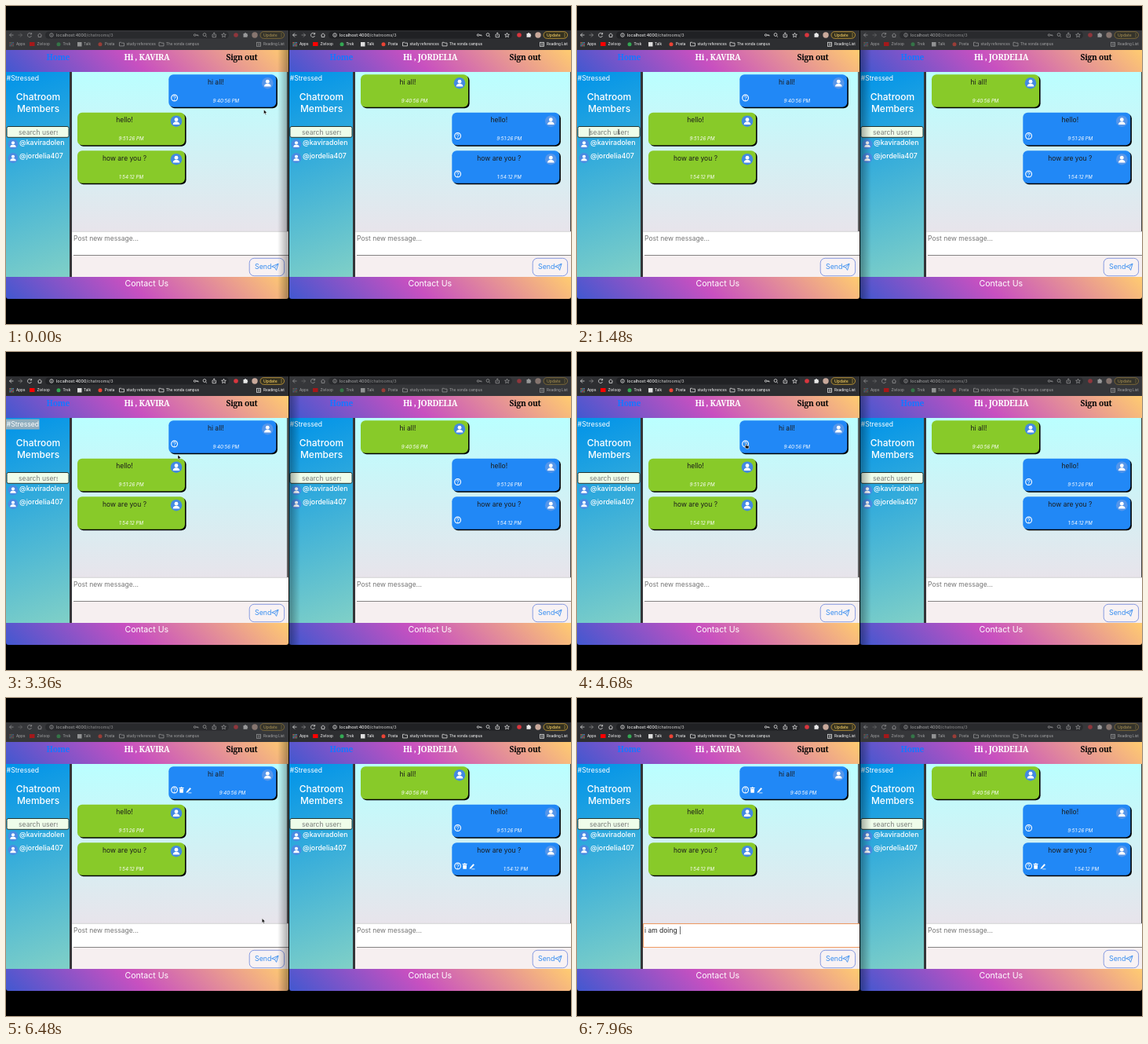
Write an HTML page that moves like this. It is 720x405 px and loops after 8000 ms.

```html
<!DOCTYPE html>
<html lang="en">
<head>
<meta charset="utf-8">
<title>Chatroom</title>
<style>
  html, body { margin: 0; width: 100%; height: 100%; overflow: hidden; background: #000; }
  #stage { position: relative; width: 720px; height: 405px; overflow: hidden; }
  #stage > svg { position: absolute; left: 0; top: 0; }
  .window { position: absolute; top: 31px; width: 359.7px; height: 342px; overflow: hidden; border-radius: 0 0 3px 3px; }
  .window > * { position: absolute; left: 0; }
  .bars { top: 0; width: 100%; height: 25px; background: #2d2e31; }
  .idle .bars { background: #36373a; }
  .ribbon { width: 100%; height: 28.5px; background: linear-gradient(43deg, #4158d0 0%, #c850c0 46%, #ffcc70 100%); }
  .sidebar { top: 53px; width: 81.3px; height: 261px; background: linear-gradient(160deg, #0093e9, #80d0c7); border-right: 3px solid #343538; }
  .chat { left: 84px; top: 53px; width: 276px; height: 204px; background: linear-gradient(#baffff, #e8e4eb); }
  .composer { left: 84px; top: 256px; width: 276px; height: 58px; background: #f6eff0; }
  .shade { top: 25px; width: 14px; height: 318px; opacity: 0; background: linear-gradient(90deg, #0005, #0000); }
  #left .shade { left: 346px; transform: scaleX(-1); }
  .idle .shade { opacity: 1; }
  .idle .chrome { opacity: .55; }
  text { font-family: Inter, sans-serif; white-space: pre; }
  text.slab { font: 600 10.3px "Noto Serif", serif; letter-spacing: -.3px; }
  .stamp { font-size: 6.1px; font-style: italic; fill: #fff; }
  .mid, .stamp { text-anchor: middle; }
  .chrome text { font-size: 4.6px; font-weight: 500; fill: #e8e8e8; }
  .line { fill: none; stroke: #ddd; stroke-width: .8; }
  #right .focus { visibility: hidden; }
</style>
</head>
<body>
<div id="stage">
  <div class="window" id="left"></div>
  <div class="window" id="right"></div>
  <svg width="720" height="405">
    <defs>
      <g id="person">
        <circle r="7.3"/>
        <circle cy="-2" r="2.4" fill="#fff"/>
        <path d="M-4.3 4.3C-4.3-.6 4.3-.6 4.3 4.3Z" fill="#fff"/>
      </g>
      <g id="help">
        <circle r="3.9" fill="none" stroke="#fff" stroke-width="1.1"/>
        <path d="M-1.4-.9C-1.3-2.7 1.5-2.6 1.4-.8C1.3.1 0 .1 0 1.1M0 2V2.8" fill="none" stroke="#fff" stroke-width=".9"/>
      </g>
      <g id="tools" fill="#fff">
        <path d="M-3-3H-1L-.6-3.7H.6L1-3H3V-2H-3ZM-2.5-1.4H2.5L2.2 3.8H-2.2Z"/>
        <path d="M6.4 2.3L10.8-2.8L12.4-1.4L8 3.3L6 3.8ZM9 3.4H12.8V4.2H8.2Z"/>
      </g>
      <g id="folder"><path class="line" d="M-3-2.2H-.8L0-1.4H3V2.4H-3Z"/></g>
    </defs>
    <g id="pointer">
      <path id="arrow" d="M0 0V5.6L1.3 4.4L2.2 6.5L3.1 6.1L2.2 4.1H4Z" fill="#000" stroke="#fff" stroke-width=".45"/>
      <path id="hand" d="M-.6-1C-.6-1.8.5-1.8.5-1V1L3 1.6C3.8 1.8 3.7 2.8 3.2 5H0L-2 2.4C-2.2 1.7-1.4 1.5-.6 2.3Z" fill="#111" stroke="#fff" stroke-width=".6"/>
      <path id="beam" d="M-1.2-3Q0-3 0-2V2Q0 3-1.2 3M1.2-3Q0-3 0-2V2Q0 3 1.2 3" fill="none" stroke="#444" stroke-width=".7"/>
    </g>
  </svg>
</div>
<script>
const LOOP = 8000;
const handles = ['@kaviradolen', '@jordelia407'];
const $ = id => document.getElementById(id);
const text = (x, y, value, attrs = '') => `<text x="${x}" y="${y}" ${attrs}>${value}</text>`;
const icon = (name, x, y, attrs = '') => `<use href="#${name}" x="${x}" y="${y}" ${attrs}/>`;
const line = (d, attrs = '') => `<path class="line" d="${d}" ${attrs}/>`;

function browserBars() {
  const dots = [0, 1, 2].flatMap(r => [0, 1, 2].map(c =>
    `<rect x="${4.5 + c * 2}" y="${46 + r * 2}" width="1.3" height="1.3" fill="${['#e66', '#6b8', '#69e'][(r + c) % 3]}"/>`)).join('');
  return `<g class="chrome">
    <rect x="50" y="32.5" width="234" height="9" rx="4.5" fill="#202124"/>
    ${line('M9.5 37H4.5M7 34.5L4.5 37L7 39.5')}
    ${line('M15.5 37H20.5M18 34.5L20.5 37L18 39.5', 'opacity=".5"')}
    ${line('M32.2 35.5A2.6 2.6 0 1 0 32.5 38M32.6 34V36H30.6')}
    ${line('M40.4 37.2L43 34.8L45.6 37.2M41.2 36.8V39.5H44.8V36.8')}
    <circle class="line" cx="58" cy="37" r="2.3"/>${line('M58 36.5V38.4M58 35.3V35.9')}
    ${text(64, 39, 'localhost:4000<tspan fill="#bbb">/chatrooms/3</tspan>', 'style="font-size:5.3px"')}
    <circle class="line" cx="240.6" cy="37" r="1.3"/>${line('M242 37H245V38.4M243.6 37V38')}
    <circle class="line" cx="253" cy="36.5" r="1.9"/>${line('M254.4 38L256 39.6')}
    ${line('M264 36.2H263V39.7H267.5V36.2H266.5M265.2 38V34M264 35L265.2 34L266.5 35')}
    ${line('M277.5 34.2L278.3 36.2L280.4 36.3L278.8 37.6L279.3 39.7L277.5 38.6L275.7 39.7L276.2 37.6L274.6 36.3L276.7 36.2Z')}
    <circle cx="293" cy="37" r="2.8" fill="#d9363e"/>
    <path d="M302.5 35H304A1 1 0 0 1 306 35H307.5V36.5A1 1 0 0 1 307.5 38.4V39.8H302.5Z" fill="#e8e8e8"/>
    <circle cx="317" cy="37" r="3.7" fill="#c9a99b"/>
    <rect x="324" y="32.7" width="30.5" height="8.6" rx="4.3" fill="#33301f" stroke="#e6b23c" stroke-width=".7"/>
    ${text(328, 38.8, 'Update', 'style="font-size:5.1px;fill:#f7cf62"')}
    ${[35, 37, 39].map(y => `<circle cx="351" cy="${y}" r=".55" fill="#f7cf62"/>`).join('')}
    ${dots}
    <rect x="30" y="46" width="6.5" height="5" fill="#f00"/>
    <circle cx="67" cy="48.7" r="2.5" fill="#34a853"/>
    <rect x="91" y="46" width="5.5" height="5.5" fill="#ddd"/>
    <circle cx="120" cy="48.7" r="2.5" fill="#ea4335"/>
    ${icon('folder', 147.5, 48.5)}${icon('folder', 198, 48.5)}
    <rect class="line" x="319.5" y="46.3" width="5" height="5"/>${line('M321 48H323.5M321 49.8H323.5')}
    ${[[13, 'Apps'], [39.5, 'Zivloop'], [72.5, 'Trek'], [99, 'Talk'], [126, 'Posta'], [153.5, 'study references'],
       [204, 'The vonda campus'], [328, 'Reading List']].map(([x, label]) => text(x, 50.4, label)).join('')}
  </g>`;
}

function bubble(side, { mine, body, time }, i) {
  const x = mine ? 207.3 : 91, y = 87.2 + i * 48.5;
  const card = (shift, fill) =>
    `<rect x="${x + shift}" y="${y + shift}" width="137" height="41.5" rx="6" fill="${fill}"/>`;
  return card(1.6, '#000') + card(0, mine ? '#2188f6' : '#88ca29')
    + text(x + 60, y + 12.7, body, 'class="mid" font-size="8.5" fill="#1b1b1b"')
    + icon('person', x + 126, y + 11, `fill="${mine ? '#5596ea' : '#4489e2'}"`)
    + text(x + (mine ? 73 : 68.5), y + 35.4, time, `class="stamp" id="${side}-stamp${i}"`)
    + (mine ? icon('help', x + 7.3, y + 29.8) + icon('tools', x + 16.3, y + 29.8, `id="${side}-tools${i}"`) : '');
}

function buildWindow(side, offset, name, mine) {
  const messages = [
    { body: 'hi all!', time: '9:40:56 PM' },
    { body: 'hello!', time: '9:51:26 PM' },
    { body: 'how are you ?', time: '1:54:12 PM' },
  ].map((m, i) => ({ ...m, mine: mine.includes(i) }));
  const member = (handle, i) =>
    icon('person', 0, 0, `fill="#4a8be2" transform="translate(9 ${176 + i * 17.5}) scale(.88)"`)
    + text(17, 177 + i * 17, handle, 'font-size="8.8" font-weight="500" fill="#fff"');

  $(side).style.left = offset + 'px';
  $(side).innerHTML = `
    <div class="bars"></div>
    <div class="ribbon" style="top:25px"></div>
    <div class="sidebar"></div><div class="chat"></div><div class="composer"></div>
    <div class="ribbon" style="top:313.7px"></div>
    <svg width="360" height="343" viewBox="0 31 360 343">
      ${browserBars()}
      ${text(51.5, 69.3, 'Home', 'class="slab" fill="#1677ff"')}
      ${text(179.5, 69.3, 'Hi , ' + name, 'class="slab mid" fill="#fff"')}
      ${text(280.5, 69.3, 'Sign out', 'class="slab" fill="#080808"')}
      <rect class="focus" id="${side}-selection" x="0" y="85.5" width="42.5" height="13" fill="#b4b4b4" opacity=".8"/>
      ${text(.8, 95.2, '#Stressed', 'font-size="8.6" fill="#fff"')}
      ${text(41, 120.3, 'Chatroom', 'class="mid" font-size="12" font-weight="500" fill="#fff"')}
      ${text(41, 135.3, 'Members', 'class="mid" font-size="12" font-weight="500" fill="#fff"')}
      <rect x="1" y="153.5" width="79" height="13.8" rx="2" fill="#effdea" stroke="#25352f"/>
      <svg x="0" y="153" width="66" height="15">${text(16, 10.8, 'search users', 'font-size="8.6" fill="#7a7d7a"')}</svg>
      <path class="focus" id="${side}-caret" d="M16 156V165.5" stroke="#222" stroke-width=".8"/>
      ${handles.map(member).join('')}
      ${messages.map((m, i) => bubble(side, m, i)).join('')}
      <rect x="358" y="84" width="1.6" height="203" fill="#444"/>
      <rect x="84.3" y="287.2" width="277" height="30.3" fill="#fff"/>
      <path d="M84.3 287.3H361" stroke="#aaa" stroke-width=".5"/>
      <path d="M86 317.5H361" stroke="#666" stroke-width=".8"/>
      <rect class="focus" id="${side}-focus" x="84.6" y="287.5" width="277" height="30" fill="none" stroke="#ef9a62"/>
      ${text(86, 299, 'Post new message...', `id="${side}-draft" font-size="8.5" fill="#757575"`)}
      <rect x="310.2" y="321.3" width="44.4" height="22.4" rx="6" fill="#f8f2f4" stroke="#6d86dc" stroke-width=".8"/>
      ${text(317, 335.2, 'Send', 'font-size="8.9" fill="#3b8ff0"')}
      <path d="M338.6 331.8L347 328.2L344.6 336.4L342.4 333ZM342.4 333L347 328.2" fill="none" stroke="#3b8ff0" stroke-width=".9" stroke-linejoin="round"/>
      ${text(179.3, 357.2, 'Contact Us', 'class="mid" font-size="10.6" fill="#fff"')}
    </svg>
    <div class="shade"></div>`;
}

buildWindow('left', 0, 'KAVIRA', [0]);
buildWindow('right', 360.5, 'JORDELIA', [1, 2]);

// Pointer stops: time, x, y
const path = [
  [0, 328.5, 132], [480, 328.5, 132], [1250, 53, 160], [1700, 53, 160], [2250, 42, 92], [2600, 42, 92],
  [3250, 219, 131], [3600, 219, 131], [4300, 215.5, 118], [4900, 215.5, 118],
  [5450, 576, 218], [5950, 576, 218], [6700, 261.5, 297], [LOOP, 261.5, 297],
];
const draft = 'i am doing ';
const between = (t, from, to) => t >= from && t < to;
const show = (id, on) => $(id).style.visibility = on ? 'visible' : 'hidden';

function pointerAt(t) {
  const i = path.findIndex(stop => stop[0] > t);
  const [t0, x0, y0] = path[i - 1], [t1, x1, y1] = path[i];
  const p = (t - t0) / (t1 - t0), e = p * p * (3 - 2 * p);
  return [x0 + (x1 - x0) * e, y0 + (y1 - y0) * e];
}

// Opening a message's tools pushes its time stamp to the right.
function setTools(side, i, on) {
  show(`${side}-tools${i}`, on);
  $(`${side}-stamp${i}`).setAttribute('x', on ? 288.5 : 280.3);
}

function render(t) {
  const rightActive = t < 1000 || between(t, 5450, 6750);
  $('left').classList.toggle('idle', rightActive);
  $('right').classList.toggle('idle', !rightActive);

  show('left-selection', between(t, 2350, 3850));
  show('left-caret', between(t, 1300, 2250));
  show('left-focus', t >= 6800);
  setTools('left', 0, t >= 4820);
  setTools('right', 1, false);
  setTools('right', 2, t >= 5800);

  const typed = draft.slice(0, Math.max(0, Math.floor((t - 7300) / 56)));
  const field = $('left-draft');
  field.textContent = typed ? typed + '|' : 'Post new message...';
  field.setAttribute('fill', typed ? '#222' : '#757575');

  const [x, y] = pointerAt(t);
  const overText = (x < 80 && between(y, 153, 168)) || (x > 85 && y > 287) || (x < 45 && y < 100);
  const overHelp = Math.hypot(x - 214.5, y - 117) < 4 || Math.hypot(x - 575.5, y - 214) < 5;
  $('pointer').setAttribute('transform', `translate(${x} ${y})`);
  show('beam', overText && !typed);
  show('hand', overHelp && !typed);
  show('arrow', !overText && !overHelp && !typed);
}

function tick() {
  render(performance.now() % LOOP);
  requestAnimationFrame(tick);
}
tick();
</script>
</body>
</html>
```
